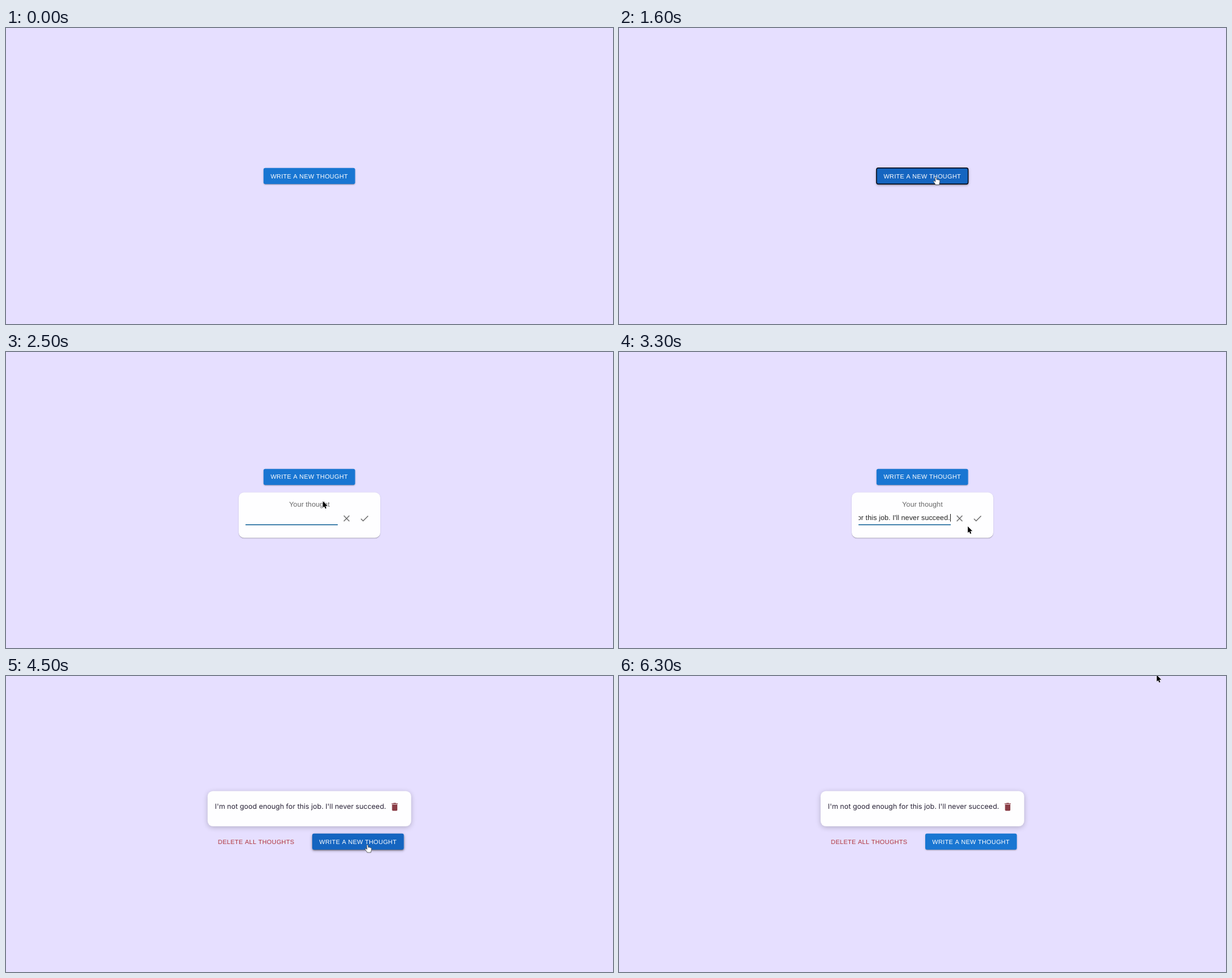
An HTML page that plays this animation: 999 by 488 pixels, repeating every 7 s.

```html
<!DOCTYPE html>
<html lang="en">
<head>
<meta charset="utf-8">
<title>Write a new thought</title>
<style>
  html, body { margin: 0; width: 100%; height: 100%; overflow: hidden; background: #e6dfff; }
  .box, #cursor { position: absolute; left: 0; top: 0; }
  svg { display: block; font-family: "Liberation Sans", Arial, sans-serif; text-rendering: geometricPrecision; }
  .card { background: #fefeff; border-radius: 8.7px; }
  .box > svg { overflow: visible; }
  .caps { font-size: 10.17px; letter-spacing: .02857em; font-kerning: none; }
  .body { font-size: 11.62px; letter-spacing: .00938em; }

  #write { width: 151px; height: 26px; border-radius: 3px;
    box-shadow: 0 2.2px .7px -1.5px #0003, 0 1.5px 1.5px #00000024, 0 .7px 3.6px #0000001f; }
  #write::before { content: ""; position: absolute; inset: 0; border-radius: 3px; opacity: var(--hover);
    box-shadow: 0 1.5px 3px -.7px #0003, 0 3px 3.6px #00000024, 0 .7px 7.3px #0000001f; }
  #write > svg { position: relative; }
  #face { fill: color-mix(in srgb, #1565c0 calc(var(--hover) * 100%), #1976d2); }
  .focus #face { stroke: #0a0a14; stroke-width: 1.45px; }

  #form { width: 233.2px; height: 75px; transform: translate(383px, 231.4px);
    box-shadow: 0 1.5px .7px -.7px #0003, 0 .7px .7px #00000024, 0 .7px 2.2px #0000001f; }
  #list { width: 335px; height: 58px; transform: translate(331.8px, 189.8px);
    box-shadow: 0 2px 9px #00000038; }
  #cursor { overflow: visible; }
</style>
</head>
<body>
<div id="list" class="box card">
  <svg width="335" height="58">
    <text x="12" y="29.1" font-size="11.62" fill="#2a2438" font-family="Inter, sans-serif">I'm not good enough for this job. I'll never succeed.</text>
    <path transform="translate(299.2 17.2) scale(.726)" fill="#8a3d46"
      d="M6 19c0 1.1.9 2 2 2h8c1.1 0 2-.9 2-2V7H6zM19 4h-3.5l-1-1h-5l-1 1H5v2h14z"/>
    <text class="caps" x="17" y="86.9" fill="#b0363c">DELETE ALL THOUGHTS</text>
  </svg>
</div>

<div id="form" class="box card">
  <svg width="233" height="75">
    <text class="body" x="116.4" y="23.9" text-anchor="middle" fill="#0009">Your thought</text>
    <svg x="11.2" y="30" width="152" height="24">
      <text id="entry" class="body" x="150.6" y="15.8" text-anchor="end" fill="#000000de">I'm not good enough for this job. I'll never succeed.</text>
      <rect id="caret" y="5.6" width="1" height="12.6" fill="#222"/>
    </svg>
    <rect x="11.2" y="52.6" width="151.8" height="1.5" fill="#17659a"/>
    <circle id="press" cx="207" cy="43" r="14.5"/>
    <g fill="#0000008f">
      <path transform="translate(168.8 34.3) scale(.726)"
        d="M19 6.41 17.59 5 12 10.59 6.41 5 5 6.41 10.59 12 5 17.59 6.41 19 12 13.41 17.59 19 19 17.59 13.41 12z"/>
      <path transform="translate(198.2 34.3) scale(.726)"
        d="M9 16.17 4.83 12l-1.42 1.41L9 19 21 7l-1.41-1.41z"/>
    </g>
  </svg>
</div>

<div id="write" class="box">
  <svg width="151" height="26">
    <rect id="face" y="-.25" width="150.8" height="26.5" rx="2.9"/>
    <svg width="150.8" height="26">
      <circle id="ripple" cx="97" cy="17" fill="#fff"/>
    </svg>
    <text class="caps" x="11.6" y="16.6" fill="#fff">WRITE A NEW THOUGHT</text>
  </svg>
</div>

<svg id="cursor" width="12" height="14">
  <path id="arrow" fill="#000" stroke="#fff" stroke-width=".9" paint-order="stroke"
    d="M0 0V10.6L2.4 8.4 4 12.2 5.8 11.4 4.2 7.7H7.6Z"/>
  <path id="hand" fill="#fff" stroke="#333" stroke-width=".7" stroke-linejoin="round"
    d="M-1.3.8C-1.3-.5.7-.5.8.8L1.3 4.2C1.8 3.3 3.2 3.6 3.3 4.4 4 3.8 5 4.2 5.1 5 5.8 4.6 6.6 5 6.6 6L6.3 9 5.4 12.5H-.6C-1 10.6-3.8 8-4 6.8-4 5.6-2.5 5.8-.9 7.4Z"/>
</svg>

<script>
const LOOP = 7000, STEP = 100;
const $ = id => document.getElementById(id);
const ramp = (t, from, to) => Math.min(1, Math.max(0, (t - from) / (to - from)));
const within = (t, from, to) => t >= from && t < to;
const show = (id, on) => { $(id).style.visibility = on ? 'visible' : 'hidden'; };
const move = (id, x, y) => { $(id).style.transform = `translate(${x}px, ${y}px)`; };

// Pointer hotspot: time, x, y
const pointerPath = [
  [300, 597, 289], [900, 521.5, 246], [2700, 521.5, 246], [3300, 574, 287.5], [3500, 595, 278.5],
  [5000, 595, 278.5], [5500, 897.5, 228.5], [5600, 897.5, 228.5], [6300, 885, -1.5]
];

function pointerAt(t) {
  const next = pointerPath.findIndex(p => p[0] > t);
  if (next < 1) return pointerPath.at(next ? -1 : 0).slice(1);
  const [t0, x0, y0] = pointerPath[next - 1], [t1, x1, y1] = pointerPath[next];
  const p = ramp(t, t0, t1), k = p * p * (3 - 2 * p);
  return [x0 + (x1 - x0) * k, y0 + (y1 - y0) * k];
}

function draw(t) {
  const formOpen = within(t, 1800, 4200), listed = t >= 4200, typed = t >= 2800;
  show('form', formOpen);
  show('list', listed);
  show('entry', formOpen && typed);
  show('caret', formOpen && !within(t, 2400, 2800) && t < 3600);
  $('caret').setAttribute('x', typed ? 150.8 : 0);
  $('press').setAttribute('opacity', t < 3500 ? 0 : t < 4000 ? .04 : .12);

  if (listed) move('write', 504, 260);
  else move('write', 423.8, formOpen ? 192.9 : 231);
  const hover = ramp(t, 700, 950) - ramp(t, 1800, 2050) + ramp(t, 4200, 4450) - ramp(t, 5200, 5450);
  $('write').style.setProperty('--hover', hover);
  $('write').classList.toggle('focus', within(t, 1600, 1800));
  $('ripple').setAttribute('r', 105 * ramp(t, 1600, 2000));
  $('ripple').setAttribute('opacity', .3 * (1 - ramp(t, 1700, 2250)) ** 2);

  const visible = t >= 400;
  const pointing = within(t, 700, 2100) || within(t, 3500, 5200);
  show('arrow', visible && !pointing);
  show('hand', visible && pointing);
  move('cursor', ...pointerAt(t));
}

function tick() {
  draw(Math.floor(performance.now() % LOOP / STEP) * STEP);
  requestAnimationFrame(tick);
}
tick();
</script>
</body>
</html>
```
